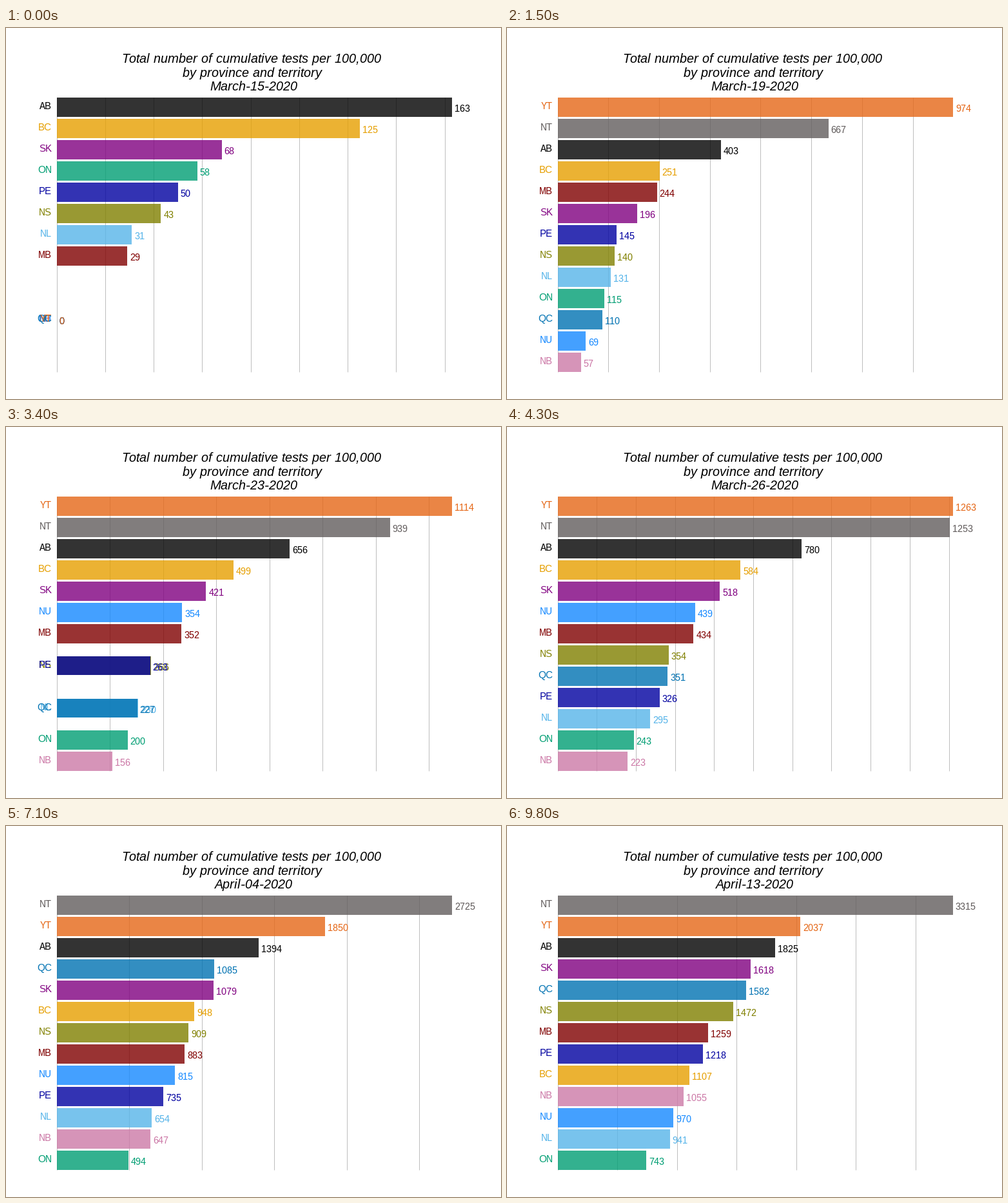
A matplotlib script for the animation above (10 s loop, 768x576 px).

```python
import numpy as np
import matplotlib.pyplot as plt
from matplotlib.animation import FuncAnimation
from matplotlib.collections import LineCollection
from matplotlib.patches import Rectangle

plt.rcParams.update({
    "font.family": "Liberation Sans",
    "text.hinting": "native",
    "text.hinting_factor": 1,
})

WIDTH, HEIGHT, DPI = 768, 576, 96
LEFT, SPAN = 78.75, 613.1       # zero line and length of the longest bar
TOP, BOTTOM = 108, 534
PITCH = (BOTTOM - TOP) / 12.9   # one rank step; a bar fills 0.9 of it
PX = 72 / DPI                   # points per pixel
LAST_DAY = 29

# Colour, then tests per 100,000 at five stages of the testing campaign
PROVINCES = {
    "AB": ("#000000", 163, 283, 543, 1216, 1825),
    "BC": ("#E69F00", 125, 125, 420, 880, 1107),
    "MB": ("#800000", 29, 213, 278, 733, 1259),
    "NB": ("#CC79A7", 0, 26, 101, 494, 1055),
    "NL": ("#56B4E9", 31, 95, 173, 540, 941),
    "NS": ("#808000", 43, 97, 190, 696, 1472),
    "NT": ("#625D5D", 0, 341, 667, 2474, 3315),
    "NU": ("#1589FF", 0, 0, 278, 748, 970),
    "ON": ("#009E73", 58, 77, 161, 397, 743),
    "PE": ("#0000A0", 50, 94, 207, 554, 1218),
    "QC": ("#0072B2", 0, 92, 129, 889, 1582),
    "SK": ("#800080", 68, 94, 334, 869, 1618),
    "YT": ("#E56717", 0, 0, 974, 1767, 2037),
}
BURST_REPORTERS = ("NT", "YT")

days = np.arange(LAST_DAY + 1)
# Stage reached on each day: slow start, fast middle, easing out at the end
steady = np.interp(days, (0, 2, 6, 11, 17, 23.5, 29), (0, 1, 2, 2.4, 3, 3.68, 4))
# Two territories hold their figures for days and catch up in bursts
bursts = np.interp(days, (0, 2, 3, 4, 7, 10, 11), (0, 1, 1, 2, 2, 2.4, 2.4))
bursts = np.where(days > 11, steady, bursts)


def daily_values(name):
    """Square roots grow evenly from stage to stage."""
    clock = bursts if name in BURST_REPORTERS else steady
    return np.interp(clock, range(5), np.sqrt(PROVINCES[name][1:])) ** 2


def mean_ranks(day_values):
    """Rank from the largest down; ties share their mean rank."""
    v = np.round(day_values)
    above = (v[None, :] > v[:, None]).sum(axis=1)
    equal = (v[None, :] == v[:, None]).sum(axis=1)
    return above + (equal + 1) / 2


names = list(PROVINCES)
values = np.array([daily_values(name) for name in names])
ranks = np.array([mean_ranks(day) for day in values.T]).T

# A day takes four frames at first, three later on
arrivals = np.where(days <= 12, 4 * days - 1, 3 * days + 11)
arrivals[0] = 0


def day_position(frame):
    """Fractional day: a short linear move, then a rest on each day."""
    day = min(int(np.searchsorted(arrivals, frame)), LAST_DAY)
    move = 3 if day == 1 else 2
    return day - np.clip((arrivals[day] - frame) / move, 0, 1)


def between(table, position):
    day = int(position)
    nxt = min(day + 1, LAST_DAY)
    return table[:, day] + (position - day) * (table[:, nxt] - table[:, day])


def grid_step(top):
    """Half of the best round step for an axis from 0 to top."""
    best_score, best = -np.inf, top
    for order, q in enumerate((1, 5, 2, 2.5, 4, 3)):
        for power in range(5):
            step = q * 10 ** power
            for count in range(1, 11):
                end = step * count
                cover = 1 - 0.5 * ((top - end) / (0.1 * top)) ** 2
                ratio = (1 / step) / (4 / max(end, top))
                density = 2 - max(ratio, 1 / ratio)
                score = 0.25 * (1 - order / 5) + 0.2 * cover + 0.5 * density
                if score > best_score:
                    best_score, best = score, step
    return best / 2


def date_text(day):
    return f"March-{15 + day}-2020" if day < 17 else f"April-{day - 16:02d}-2020"


fig = plt.figure(figsize=(WIDTH / DPI, HEIGHT / DPI), dpi=DPI, facecolor="white")
ax = fig.add_axes([0, 0, 1, 1])
ax.set_xlim(0, WIDTH)
ax.set_ylim(HEIGHT, 0)
ax.axis("off")


def title_line(x, y, text):
    return ax.text(x, y, text, size=20 * PX, style="italic", ha="center", va="baseline")


title_line(381.5, 54, "Total number of cumulative tests per 100,000")
title_line(381.5, 75.6, "by province and territory")
date = title_line(384.5, 97.2, "")

grid = LineCollection([], colors="#BEBEBE", linewidths=PX, zorder=1)
ax.add_collection(grid)

bars, tags, counts = [], [], []
for name in names:
    color = PROVINCES[name][0]
    bar = Rectangle((LEFT, 0), 0, 0.9 * PITCH, facecolor=color, alpha=0.8,
                    linewidth=0, snap=True, zorder=2)
    bars.append(ax.add_patch(bar))
    label = dict(size=15 * PX, color=color, va="baseline")
    tags.append(ax.text(71, 0, name, ha="right", zorder=3, **label))
    counts.append(ax.text(0, 0, "", ha="left", zorder=4, **label))


def update(frame):
    position = day_position(frame)
    now, rank = between(values, position), between(ranks, position)
    top = now.max()
    date.set_text(date_text(int(np.ceil(position - 0.5))))

    ticks = np.arange(0, top + 1e-6, grid_step(top))
    grid.set_segments([[(x, TOP), (x, BOTTOM)] for x in LEFT + SPAN * ticks / top])

    for bar, tag, count, value, place in zip(bars, tags, counts, now, rank):
        length = SPAN * value / top
        y = TOP + PITCH * (place - 1)
        center = y + 0.45 * PITCH
        bar.set_y(y)
        bar.set_width(length)
        bar.set_visible(length > 0)
        tag.set_y(center + 3.2)
        count.set_position((LEFT + length + 4, center + 7))
        count.set_text(f"{value:.0f}")
    return [date, grid, *bars, *tags, *counts]


animation = FuncAnimation(fig, update, frames=100, interval=100,
                          repeat=True, repeat_delay=0, blit=False)
plt.show()
```
